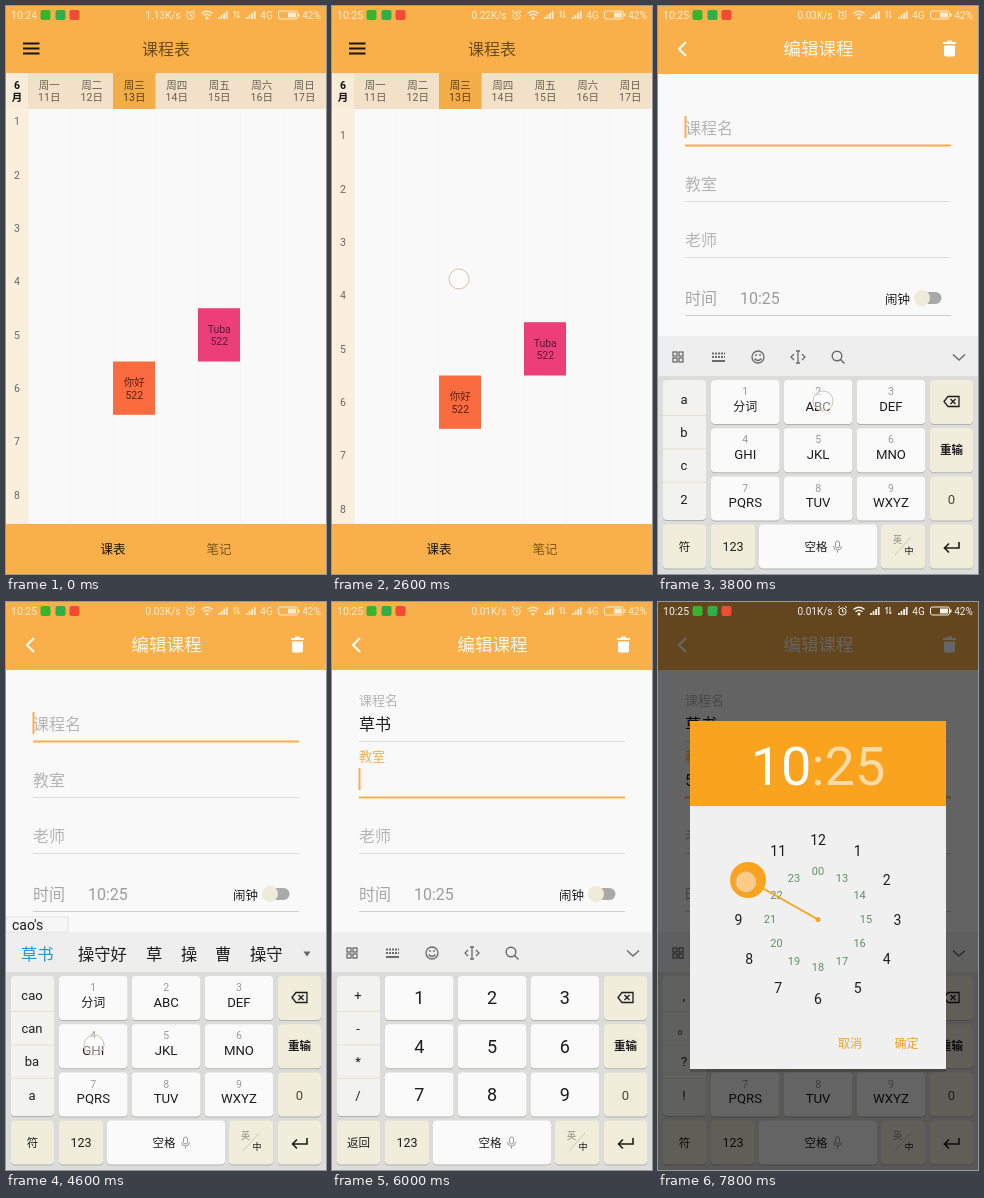
These frames come from a looping animation (320x568 px, 8 s). An HTML page:

```html
<!DOCTYPE html>
<html lang="zh">
<head>
<meta charset="utf-8">
<title>课程表</title>
<style>
html, body { margin: 0; width: 100%; height: 100%; overflow: hidden; background: #f9f9f9; }
svg { display: block; width: 100vw; height: 100vh; font-family: Roboto, "Noto Sans CJK SC", "Noto Sans CJK", sans-serif; }
text { white-space: pre; }
</style>
</head>
<body>
<svg id="stage" viewBox="0 0 320 568"></svg>
<script>
const LOOP = 8000, STEP = 200;
const ORANGE = '#f9b04a', INK = '#1c1c1c', GREY = '#b5b5b5', CREAM = '#f0eedb';
const stage = document.getElementById('stage');

// Drawing helpers
const rect = (x, y, w, h, fill, extra = '') =>
  `<rect x="${x}" y="${y}" width="${w}" height="${h}" fill="${fill}" ${extra}/>`;
const circle = (x, y, r, fill, extra = '') =>
  `<circle cx="${x}" cy="${y}" r="${r}" fill="${fill}" ${extra}/>`;
const path = (d, stroke, w = 1, extra = '') =>
  `<path d="${d}" fill="none" stroke="${stroke}" stroke-width="${w}" ${extra}/>`;
const shape = (d, fill) => `<path d="${d}" fill="${fill}"/>`;
const text = (x, cy, s, size, fill, anchor = 'middle', extra = '') =>
  `<text x="${x}" y="${(cy + size * 0.36).toFixed(2)}" font-size="${size}" fill="${fill}" text-anchor="${anchor}" ${extra}>${s}</text>`;
const left = (x, cy, s, size, fill) => text(x, cy, s, size, fill, 'start');
const group = (body, attrs) => `<g ${attrs}>${body}</g>`;

// Latest entry at or before t from [[time, value], ...]
const at = (list, t) => list.reduce((v, e) => t >= e[0] ? e[1] : v, null);
// Straight lines between points
function lerp(points, t) {
  for (let i = 1; i < points.length; i++) {
    const [t0, a] = points[i - 1], [t1, b] = points[i];
    if (t <= t1) return a + (b - a) * Math.max(0, t - t0) / (t1 - t0);
  }
  return points[points.length - 1][1];
}

const SPEED = [[0, '1.13K/s'], [600, '0.22K/s'], [3000, '0.03K/s'], [6000, '0.01K/s']];
const SCROLL = [[0, 14], [200, 50], [400, 125], [600, 190], [800, 223], [1200, 223],
  [1400, 190], [1600, 125], [1800, 60], [2000, 15], [2200, 0]];
const TOUCH = [[0, null], [1000, [246, 277]], [1200, [245, 300]], [1400, [243, 350]], [1600, [241, 420]],
  [1800, null], [2600, [127, 273]], [2800, [127, 273]], [3000, null],
  [3800, [165, 395]], [4200, [235, 442]], [4400, [88, 490]], [4600, [88, 443]], [4800, [160, 490]],
  [5000, null], [5200, [150, 545]], [5400, null], [5600, [60, 180]], [5800, [75, 540]], [6000, null],
  [6200, [160, 443]], [6400, [88, 396]], [6800, [27, 540]],
  [7000, [61, 334]], [7200, [100, 294]], [7400, null], [7800, [88, 280]]];
const PINYIN = [[0, ''], [4000, 'a'], [4200, 'ba'], [4400, 'cao'], [4600, "cao's"],
  [4800, "cao'sh"], [5000, "cao'shu"], [5400, '']];
const ROOM = [[0, ''], [6200, '5'], [6400, '51'], [6600, '511']];

function statusBar(t) {
  const w = t < 7400 ? '#fdebd0' : '#f4f0ea';
  const bars = (x, n) => [0, 1, 2, 3].map(i =>
    rect(x + i * 2.6, 11 - i * 2, 1.8, 2 + i * 2, w, i < n ? '' : 'opacity=".4"')).join('');
  return left(5, 9.5, t < 1800 ? '10:24' : '10:25', 10.5, w)
    + rect(34.5, 4, 10, 10, '#35b42c', 'rx="2"') + rect(49.5, 4, 10, 10, '#2fae4a', 'rx="2"')
    + rect(63.5, 4, 10, 10, '#ef4b35', 'rx="2"')
    + text(174.5, 9.5, at(SPEED, t), 10, w, 'end')
    + circle(184.5, 9.5, 3.7, 'none', `stroke="${w}"`)
    + path('M184.5 7v3h2M180 6l2-2M189 6l-2-2', w)
    + path('M195.5 7.5q5.5-4.5 11 0M197.5 9.7q3.5-2.8 7 0', w, 1.4) + circle(201, 12, 1.5, w)
    + bars(212, 4) + path('M229 12V5l-1.5 2M232 5v7l1.5-2', w) + bars(240, 4)
    + text(260.5, 9.5, '4G', 10, w)
    + rect(272.5, 5, 19, 8, 'none', `rx="2" stroke="${w}"`) + rect(282, 6.5, 8, 5, w) + rect(292, 7.5, 1.5, 3, w)
    + text(305.5, 9.5, '42%', 10, w);
}

function touchDot(t) {
  const p = at(TOUCH, t);
  return p ? circle(p[0], p[1], 10, '#fff', 'fill-opacity=".45" stroke="#d3c5ac"') : '';
}

// Timetable
const ROW = 53.3, COL = 42.5, TOP = 103;
function lesson(day, row, name, fill, color, scroll) {
  const x = 22 + day * COL, y = TOP - scroll + row * ROW, mid = x + COL / 2;
  return rect(x, y, 42, ROW, fill) + text(mid, y + 21, name, 10.5, color) + text(mid, y + 33.3, '522', 10.5, color);
}

function timetable(t) {
  const scroll = lerp(SCROLL, t);
  let grid = rect(0, TOP, 22.5, 415, '#f9efdc');
  for (let i = 1; i < 7; i++) grid += rect(22 + i * COL, TOP, 0.6, 415, '#f4f4f4');
  for (let i = 0; i < 12; i++)
    grid += text(11, TOP - scroll + (i + 0.5) * ROW, i + 1, 10.5, '#6d665c');
  grid += lesson(4, 4, 'Tuba', '#ec3f7a', '#5f1733', scroll) + lesson(2, 5, '你好', '#fa6b3f', '#5a2210', scroll);

  let head = rect(0, 67, 320, 36, '#f0e1c8') + rect(0, 67, 22, 36, '#f8ecd8') + rect(107, 67, 42.5, 36, '#f3ad47')
    + text(11, 79.5, '6', 10.5, '#111', 'middle', 'font-weight="700"')
    + text(11, 91.5, '月', 10.5, '#111', 'middle', 'font-weight="700"');
  [...'一二三四五六日'].forEach((d, i) => {
    const x = 22 + (i + 0.5) * COL, c = i === 2 ? '#5a3f16' : '#6b6050';
    head += text(x, 79.5, '周' + d, 10.5, c) + text(x, 91.5, 11 + i + '日', 10.5, c);
  });
  return grid + rect(0, 0, 320, 67, ORANGE) + head
    + path('M17 37.5h16.5M17 42.5h16.5M17 47.5h16.5', '#1c1408', 2)
    + text(160, 43, '课程表', 16, '#6b4a1c')
    + rect(0, 518, 320, 50, ORANGE)
    + text(107, 543.5, '课表', 12.5, '#1a1206') + text(213, 543.5, '笔记', 12.5, '#7a5520');
}

// Course form
function field(y, label, value, focus) {
  const small = value || (focus && label !== '课程名');
  const end = 27 + value.length * 8.9;
  return left(27, small ? y - 24 : y, label, small ? 13 : 16, focus && small ? ORANGE : GREY)
    + left(27, y, value, 16, INK)
    + (focus ? rect(27, y + 16.5, 266, 2, ORANGE) + rect(value ? end : 26.5, y - 12, 2, 22, ORANGE)
             : rect(27, y + 17, 266, 1, '#dedede'));
}

function form(t) {
  const onRoom = t >= 5600;
  return rect(0, 0, 320, 68, ORANGE)
    + path('M28 36l-7 7 7 7', '#fff', 2)
    + text(160.5, 43, '编辑课程', 17.6, '#fff6e8')
    + rect(285, 36, 13, 2, '#fff') + rect(289, 34.5, 5, 2, '#fff')
    + shape('M286 39.5h11v9q0 2-2 2h-7q-2 0-2-2z', '#fff')
    + field(122, '课程名', t >= 5400 ? '草书' : '', !onRoom)
    + field(178, '教室', at(ROOM, t), onRoom)
    + field(234, '老师', '', false)
    + left(27, 292, '时间', 16, '#a6a6a6') + left(82, 292, '10:25', 16, '#9c9c9c')
    + rect(27, 309, 266, 1, '#cfcfcf')
    + left(227, 293, '闹钟', 12.5, INK)
    + rect(260, 286, 23.5, 12, '#a9a9a9', 'rx="6"')
    + circle(264, 292, 8, '#eeebd8');
}

// Keyboard
function key(x, y, w, h, fill) {
  return rect(x, y + 1, w, h, '#b2b2b2', 'rx="4"') + rect(x, y, w, h, fill, 'rx="4"');
}

function toolbar() {
  const c = '#6b6b6b';
  let s = '';
  for (const [x, y] of [[15, 346], [21, 346], [15, 352], [21, 352]])
    s += rect(x, y, 4, 4, 'none', `stroke="${c}" stroke-width="1.3"`);
  s += path('M54 347.5h13M54 351h13', c, 2, 'stroke-dasharray="2 1"') + path('M54 355h13', c, 2);
  s += circle(100, 351, 6, 'none', `stroke="${c}" stroke-width="1.3"`)
    + path('M96.5 352.5q3.5 4 7 0', c, 1.3) + circle(98, 349, 0.9, c) + circle(102, 349, 0.9, c);
  s += path('M138 345h4M140 345v12M138 357h4M136 348l-3 3 3 3M144 348l3 3-3 3', c, 1.3);
  s += circle(179, 350, 4.8, 'none', `stroke="${c}" stroke-width="1.4"`) + path('M182.5 353.5l4 4', c, 1.5);
  return s + path('M295 348.5l6 5.5 6-5.5', c, 1.5);
}

function candidates(py) {
  const words = py.length < 3 ? ['啊', '吧', '不', '从', '才', '擦'] : ['草书', '操守好', '草', '操', '曹', '操守'];
  const xs = [15, 72, 140, 175, 209, 244];
  return rect(0, 315, 62, 15, '#f7f7f7', 'stroke="#ddd" stroke-width=".8"')
    + left(6, 322.5, py, 14, INK)
    + words.map((w, i) => left(xs[i], 352, w, 16.3, i ? INK : '#1e96e0')).join('')
    + shape('M297.5 349.5h7l-3.5 5z', '#666');
}

function sideKeys(t, py, digits) {
  if (digits) return ['+', '-', '*', '/'];
  if (py.length > 2) return ['cao', 'can', 'ba', 'a'];
  return t < 5400 ? ['a', 'b', 'c', '2'] : [',', '。', '?', '!'];
}

const LETTERS = ['分词', 'ABC', 'DEF', 'GHI', 'JKL', 'MNO', 'PQRS', 'TUV', 'WXYZ'];
function keyboard(t) {
  const py = at(PINYIN, t), digits = t >= 6000 && t < 6800;
  const spaceDown = t >= 5200 && t < 5400;
  let s = rect(0, 330, 320, 40, '#eeeeee') + rect(0, 370, 320, 198, '#dcdcdb')
    + (py ? candidates(py) : toolbar())
    + key(5, 374, 43, 140, '#f2f2ef');
  sideKeys(t, py, digits).forEach((c, i) => {
    s += text(26, 393 + i * 33.4, c, 13, INK);
    if (i) s += rect(5, 409 + (i - 1) * 33.4, 43, 1, '#e6e3cd');
  });

  LETTERS.forEach((c, i) => {
    const x = 53 + (i % 3) * 72.8, y = 374 + Math.floor(i / 3) * 48.2;
    const mid = x + 34.3;
    s += key(x, y, 68.6, 44, '#fafafa');
    s += digits ? text(mid, y + 22, i + 1, 18, INK)
      : text(mid, y + 11.5, i + 1, 10.5, '#9a9a9a') + text(mid, y + 26.3, c, i ? 13.2 : 12, INK);
  });

  for (let i = 0; i < 3; i++) s += key(272, 374 + i * 48.2, 43, 44, CREAM);
  s += key(272, 518.5, 43, 44, CREAM)
    + path('M286 395.5l4-5h11v10h-11z', INK, 1.3) + path('M292.5 393l5 5M297.5 393l-5 5', INK, 1.3)
    + text(293.5, 444, '重输', 11.5, INK, 'middle', 'font-weight="700"')
    + text(293.5, 493, '0', 13, '#444')
    + path('M301 536v6h-14M291 537.5l-4.5 4.5 4.5 4.5', INK, 1.6);

  return s + key(5, 518.5, 43, 44, CREAM) + text(26.5, 540.5, digits ? '返回' : '符', 11.5, INK)
    + key(53, 518.5, 44, 44, CREAM) + text(75, 540.5, '123', 12.5, INK)
    + key(101, 518.5, 118, 44, spaceDown ? '#bdbdbd' : '#fafafa') + text(158, 540.5, '空格', 11.5, INK)
    + rect(177.5, 535, 4, 7, 'none', 'rx="2" stroke="#999"') + path('M175.5 540q0 4 4 4t4-4M179.5 544v2.5', '#999')
    + key(223, 518.5, 44, 44, CREAM) + text(239.5, 534, '英', 9, '#888') + text(251, 545, '中', 9, '#111')
    + path('M237 549l16-18', '#bbb', 0.8);
}

// Clock dialog
function ring(radius, size, label, color) {
  let s = '';
  for (let i = 0; i < 12; i++) {
    const a = i * Math.PI / 6;
    s += text((160 + radius * Math.sin(a)).toFixed(1), 317.5 - radius * Math.cos(a), label(i), size, color);
  }
  return s;
}

function dialog() {
  const accent = '#f9a31f';
  return rect(32, 122, 256, 348, '#000', 'opacity=".18"')
    + rect(32, 119, 256, 348, '#f0f0f0') + rect(32, 119, 256, 85, accent)
    + `<text x="160" y="183" font-size="54" text-anchor="middle" fill="#fff">10<tspan fill="#fcdba5">:25</tspan></text>`
    + ring(79.5, 14, i => i || 12, INK)
    + ring(48, 11, i => i ? 12 + i : '00', '#5d9263')
    + path('M160 317.5L90 278', accent, 2) + circle(160, 317.5, 2.5, accent)
    + circle(90, 278, 18, accent)
    + text(192, 442, '取消', 12, accent) + text(248.5, 442, '确定', 12, accent);
}

function render(t) {
  let s = rect(0, 0, 320, 568, '#f9f9f9');
  if (t < 3000) s += timetable(t);
  else {
    const drop = lerp([[3000, 238], [3200, 90], [3400, 0]], t);
    s += form(t) + group(keyboard(t), `transform="translate(0 ${drop})"`);
  }
  if (t >= 7400) {
    const shown = t < 7600 ? 0.6 : 1;
    s += rect(0, 0, 320, 568, '#000', `opacity="${0.6 * shown}"`) + group(dialog(), `opacity="${shown}"`);
  }
  stage.innerHTML = s + statusBar(t) + touchDot(t);
}

let last = -1;
function tick(now) {
  const t = Math.floor((now % LOOP) / STEP) * STEP;
  if (t !== last) render(last = t);
  requestAnimationFrame(tick);
}
render(0);
requestAnimationFrame(tick);
</script>
</body>
</html>
```
